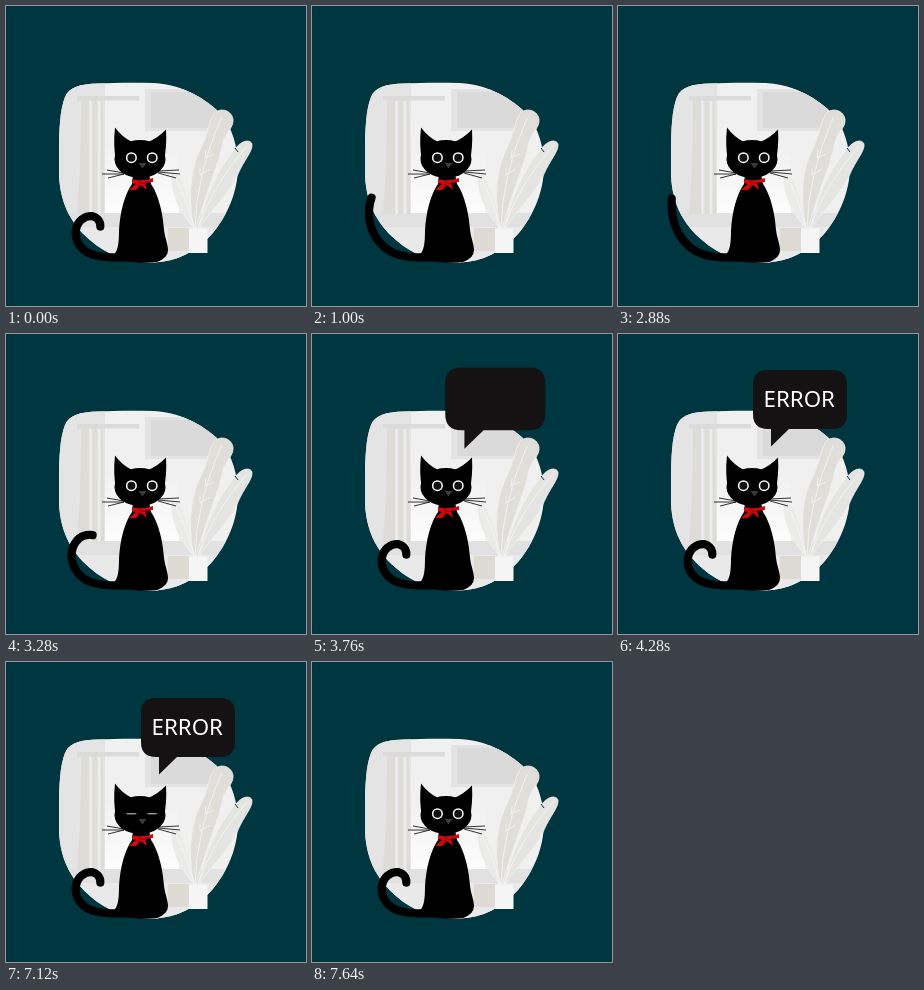
These frames come from a looping animation (300x300 px, 7.72 s). An HTML page:

```html
<!DOCTYPE html>
<html lang="en">
<head>
<meta charset="utf-8">
<title>Cat error</title>
<style>
  html, body { margin: 0; width: 100%; height: 100%; overflow: hidden; background: #003640; }
  svg { display: block; width: 100%; height: 100%; }
  text { font: 22.3px "Noto Sans", "Open Sans", sans-serif; fill: #fff; }
</style>
</head>
<body>
<svg viewBox="0 0 300 300">
  <defs>
    <clipPath id="room">
      <path d="M53 150C53 122 54 104 59 91C63 81 74 78 92 77.500C110 76.500 130 76.500 148 77C178 79 200 93 216 109C226 121 232 142 232 160C232 185 222 209 206 228C190 246 170 256 148 256.500C124 257 102 250 84 234C64 217 53 195 53 165Z"/>
    </clipPath>
    <linearGradient id="glow" x2="0" y2="1">
      <stop stop-color="#f0f0f0"/>
      <stop offset="1" stop-color="#fdfdfd"/>
    </linearGradient>
  </defs>

  <g clip-path="url(#room)">
    <path fill="#f0f0f0" d="M50 70h190v190H50z"/>
    <path fill="#e4e4e4" d="M50 70h49v140H50z"/>
    <path fill="url(#glow)" d="M99 140h74v67H99z"/>
    <path fill="#e1e1e1" d="M50 207h190v14H50z"/>
    <path fill="#e9e9e9" d="M50 221h190v40H50z"/>
    <path fill="#dcdad3" d="M162 222h22v23h-22z"/>
    <path fill="#dbdbdb" d="M71 90h62v4.500H71z"/>
    <path fill="#dddcd6" d="M75 94h8v114H71Q75 160 75 94zM86.500 94h4.500v114h-4.500zM95 94h2l1 114h-3z"/>
    <path fill="none" stroke="#efefed" stroke-width="1.500" d="M84.500 95v113M93 95v113"/>
    <path fill="#e3e3e3" d="M139 83h72v42h-72z"/>
    <path fill="#dadada" d="M145 86h66v36h-66z"/>
  </g>

  <g stroke="#f2f2f2" stroke-width=".8">
    <path fill="#ebebea" d="M188 222C174 207 164 188 166 168C174 165 181 185 190 222Z"/>
    <path fill="#dfded8" d="M188 222C182 190 184 168 193 146C201 131 202 119 207 109C212 101 225 103 227 113C228 122 219 127 217 136C213 158 204 175 190 222Z"/>
    <path fill="#e4e4e2" d="M192 224C199 192 211 164 229 143C236 134 244 133 246 138C247 145 238 154 232 168C222 190 206 202 192 224Z"/>
    <path fill="none" stroke="#f7f7f7" d="M189 222Q190 170 215 112M192 222Q206 180 241 140M188 222Q180 190 168 170M200 144l-1 8 9-4M194 162v7l10-6"/>
  </g>
  <path stroke="#003640" d="M229 142l3 4"/>
  <path fill="#f5f5f5" d="M183 222.500h18.500V247H183z"/>

  <path id="tail" fill="none" stroke="#000" stroke-width="8.200" stroke-linecap="round" stroke-linejoin="round"/>
  <path d="M126 178C119 188 114 205 113 225C113 236 112 244 109 247Q108 252 117 255Q138 258 151 256Q162 252 162 244C162 238 159 232 158 224C157 205 151 186 145 178L143 168H127Z"/>
  <ellipse cx="134" cy="153" rx="25.500" ry="19"/>
  <path d="M109 121.500Q116 131 126 136L110 155Q107 140 109 121.500ZM160 123.500Q152 132 142 136L158 155Q161 140 160 123.500Z"/>
  <path fill="none" stroke="#000" stroke-width=".8" d="M118 167L101 164M118 168L96 168M118 168L102 172M152 165L173 164M152 166L174 168M152 167L170 172"/>
  <path fill="#3b3b3b" d="M132.500 157h8l-4 5.500z"/>
  <g class="eye"></g>
  <g class="eye"></g>
  <path fill="#d00a0c" d="M126 173Q136 176 147 172L147 176L139 177L141 184L135 179L130 184L123 184L130 178L126 177Z"/>
  <path fill="none" stroke="#780505" stroke-width=".7" d="M132 175l5 3 4-3M131 181l3-3"/>

  <g id="bubble">
    <path fill="#141213" d="M150 36H214Q229 36 229 51V80Q229 95 214 95H171L153 112.500V95H150Q135 95 135 80V51Q135 36 150 36Z"/>
    <text id="label" x="145.500" y="73"></text>
  </g>
</svg>
<script>
const LOOP = 7720, STEP = 40;
const tail = document.getElementById("tail");
const bubble = document.getElementById("bubble");
const label = document.getElementById("label");
const eyes = [...document.querySelectorAll(".eye")];

// Tail heading in degrees along its length: 0 is left, 90 is up.
const CURLED = [0, 2, 18, 60, 108, 172, 275];
const SWUNG = [0, 2, 16, 36, 45, 46, 26];
const TAIL_LENGTH = 104, TAIL_PARTS = 36;

// Piecewise linear value through [time, value] pairs.
function track(t, keys) {
  if (t <= keys[0][0]) return keys[0][1];
  for (let i = 1; i < keys.length; i++) {
    const [t0, v0] = keys[i - 1], [t1, v1] = keys[i];
    if (t <= t1) return v0 + (v1 - v0) * (t - t0) / (t1 - t0);
  }
  return keys[keys.length - 1][1];
}

function tailPath(swing) {
  const d = TAIL_LENGTH / TAIL_PARTS;
  let x = 120, y = 251.5, path = `M${x} ${y}`;
  for (let n = 0; n < TAIL_PARTS; n++) {
    const k = (n + 0.5) / TAIL_PARTS * 6, i = Math.floor(k);
    const at = list => list[i] + (list[i + 1] - list[i]) * (k - i);
    const a = (at(CURLED) * (1 - swing) + at(SWUNG) * swing) * Math.PI / 180;
    x -= d * Math.cos(a);
    y -= d * Math.sin(a);
    path += `L${x.toFixed(2)} ${y.toFixed(2)}`;
  }
  return path;
}

function swingAt(t) {
  const u = t < 2200 ? t : t - 2200;
  return track(u, [[360, 0], [800, 1], [920, 1], [1160, 0]]);
}

function openAt(t) {
  const u = t < 5040 ? t - 2040 : t - 7080;
  return track(u, [[-40, 1], [0, 0.65], [40, 0.1], [80, 0.65], [120, 1]]);
}

function scaleAt(t) {
  if (t < 3640 || t >= 7640) return 0;
  return track(t, [[3640, 0.45], [3680, 0.95], [3720, 1.27], [3760, 1.064],
    [3800, 0.97], [3840, 0.99], [3880, 1], [7560, 1], [7600, 0.5]]);
}

function draw(now) {
  const t = Math.floor(now % LOOP / STEP) * STEP;
  tail.setAttribute("d", tailPath(swingAt(t)));

  const open = openAt(t);
  eyes.forEach((eye, i) => {
    eye.setAttribute("transform", `translate(${i ? 146.2 : 125.4} 151.7) scale(1 ${open})`);
    eye.lastChild.setAttribute("r", 1.2 + 2.8 * open);
  });

  const s = scaleAt(t);
  bubble.setAttribute("visibility", s ? "visible" : "hidden");
  bubble.setAttribute("transform", `translate(162 77) scale(${s}) translate(-162 -77)`);
  const typed = Math.max(0, Math.floor((t - 3960) / 80) + 1);
  label.textContent = "ERROR".slice(0, typed);
}

for (const eye of eyes) {
  eye.innerHTML = '<circle r="5.5" fill="#fff"/><circle fill="#111"/>';
}

const start = performance.now();
function tick() {
  draw(performance.now() - start);
  requestAnimationFrame(tick);
}
tick();
</script>
</body>
</html>
```
